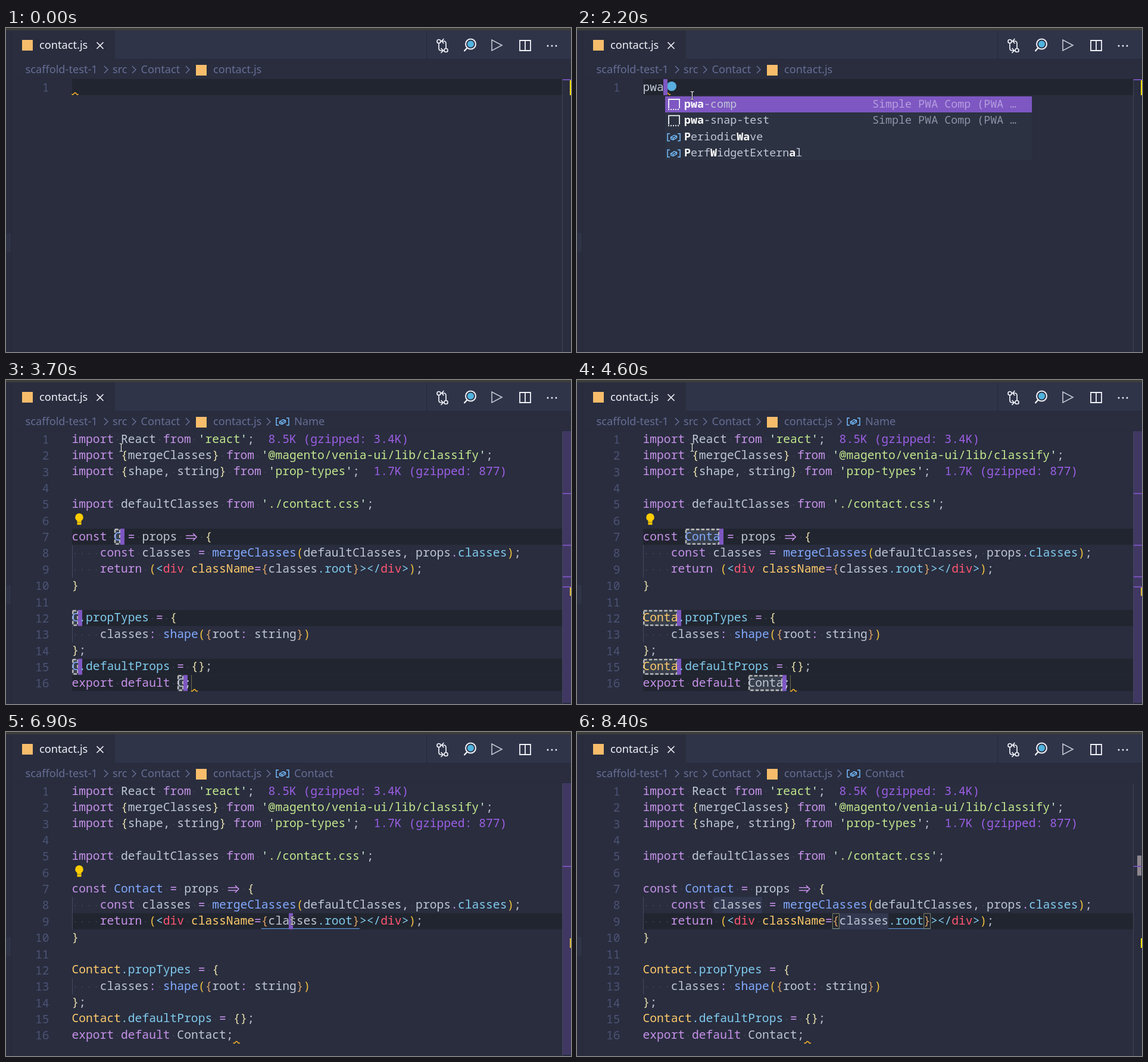
Animation of 949 by 545 pixels, one loop 8600 ms. Source, as an HTML page with a canvas:

```html
<!DOCTYPE html>
<html lang="en">
<head>
<meta charset="utf-8">
<title>Snippet in an editor</title>
<style>
html, body { margin: 0; height: 100%; overflow: hidden; background: #292d3e; }
canvas { display: block; }
</style>
</head>
<body>
<canvas id="stage" width="949" height="545"></canvas>
<script>
const ctx = document.getElementById('stage').getContext('2d');
const LOOP = 8600, LEFT = 110.5, TOP = 86, CELL = 11.79, ROW = 27.35, RULER = 17.4;
const CODE_FONT = '19.65px "Noto Sans Mono", monospace';
const LIST_FONT = '18.35px "Noto Sans Mono", monospace';
const UI_FONT = '18.2px "Noto Sans", sans-serif';
const PURPLE = '#7e57c2', YELLOW = '#ffb62c', BLUE = '#75beff', MUTED = '#676e95', WHITE = '#f0f2f8';

const COLORS = {
  k: '#c792ea', t: '#bfc7d5', q: '#d9f5dd', s: '#c3e88d', y: '#e4dcaa', b: '#82aaff',
  c: '#80cbee', r: '#ff5572', o: '#ffcb6b', g: '#f0c040', a: '#d9a066', p: '#9d5fe6'
};

// Each piece starts with its colour key.
const snippet = name => {
  const owner = name.length > 1 ? 'o' : 'b';
  return [
    "kimport §tReact §kfrom §q'§sreact§q'§t;§p  8.5K (gzipped: 3.4K)",
    "kimport §y{§tmergeClasses§y} §kfrom §q'§s@magento/venia-ui/lib/classify§q'§t;",
    "kimport §y{§tshape, string§y} §kfrom §q'§sprop-types§q'§t;§p  1.7K (gzipped: 877)",
    "",
    "kimport §tdefaultClasses §kfrom §q'§s./contact.css§q'§t;",
    "",
    `kconst §b${name} §k= §tprops §k=> §y{`,
    "t    §kconst §tclasses §k= §bmergeClasses§g(§tdefaultClasses, props§k.§cclasses§g)§t;",
    "t    §kreturn §g(§c<§rdiv §oclassName§k=§a{§tclasses§c.root§a}§c></§rdiv§c>§g)§t;",
    "y}",
    "",
    `${owner}${name}§c.propTypes §k= §y{`,
    "t    classes§k: §bshape§g(§a{§troot§k: §tstring§a}§g)",
    "y}§t;",
    `${owner}${name}§c.defaultProps §k= §y{}§t;`,
    `kexport default §t${name};`
  ];
};

// The name field: [row, column] of every linked copy.
const FIELDS = [[7, 6], [12, 0], [15, 0], [16, 15]];
const NAMES = [[2300, 'Name'], [3700, 'C'], [4100, 'Co'], [4300, 'Con'], [4500, 'Cont'],
  [4600, 'Conta'], [4900, 'Contac'], [5000, 'Contact']];
const TYPED = [[0, ''], [1600, 'p'], [1800, 'pw'], [2000, 'pwa']];
const CARET_ON = [[600, 1100], [1600, 2800], [3300, 5600], [6000, 6500], [6800, 7400], [7900, 8400]];
const POINTER = [[200, 171, 43], [300, 184, 90], [400, 193, 121], [600, 193, 121], [900, 193, 113],
  [6200, 193, 113], [6300, 341, 153], [6400, 341, 153], [6800, 480, 317], [7300, 480, 317],
  [7500, 470, 200], [7700, 446, 80], [7900, 450, 11]];
const SUGGESTIONS = ['pwa-comp', 'pwa-snap-test', 'PeriodicWave', 'PerfWidgetExternal'];

const colX = col => LEFT + col * CELL;
const rowY = row => TOP + (row - 1) * ROW;
const latest = (steps, t) => steps.filter(step => step[0] <= t).pop()[1];

function rect(x, y, w, h, color) {
  ctx.fillStyle = color;
  ctx.fillRect(x, y, w, h);
}
function text(str, x, y, color, font) {
  ctx.font = font;
  ctx.fillStyle = color;
  ctx.fillText(str, x, y);
}
function stroke(path, color, width = 1.5) {
  ctx.strokeStyle = color;
  ctx.lineWidth = width;
  ctx.stroke(new Path2D(path));
}
function disc(x, y, r, color) {
  ctx.fillStyle = color;
  ctx.beginPath();
  ctx.arc(x, y, r, 0, 7);
  ctx.fill();
}
function ring(x, y, r, color, width = 1.7) {
  ctx.strokeStyle = color;
  ctx.lineWidth = width;
  ctx.beginPath();
  ctx.arc(x, y, r, 0, 7);
  ctx.stroke();
}
function symbolIcon(x, y) {
  stroke(`M${x + 4} ${y - 6}h-4v12h4M${x + 17} ${y - 6}h4v12h-4`, BLUE);
  stroke(`M${x + 5.5} ${y}l6-3.5 4 1.5v3l-6 3.5-4-1.5zl4 1.5 6-3.5M${x + 9.5} ${y + 1.5}v3`, BLUE, 1.4);
}
function squiggle(x, y) {
  let path = '';
  for (let i = 0; i <= 11; i += 0.5)
    path += `${i ? 'L' : 'M'}${x + i} ${y - 1.6 * Math.cos((i - 5.5) * Math.PI / 4)}`;
  stroke(path, YELLOW);
}
function caret(row, x) {
  rect(Math.round(x), rowY(row), 7, ROW - 0.4, PURPLE);
}
function highlight(row) {
  rect(111, rowY(row), 823, ROW - 0.4, '#21252f');
}

function drawFrame() {
  rect(0, 0, 949, 545, '#292d3e');
  rect(183, 4, 766, 49, '#2f3449');
  rect(0, 0, 949, 4, '#3d3c39');
  rect(8, 4, 2, 541, '#272a3a');
  rect(0, 345, 8, 32, '#2f3346');
  rect(183, 52, 766, 1, '#272a39');
  rect(706, 4, 1, 49, '#272a39');

  rect(27, 20, 18, 18, '#f7bd6b');
  text('contact.js', 56, 35, WHITE, UI_FONT);
  stroke('M152.500 24l11 11M163.500 24l-11 11', WHITE, 1.7);

  ring(727, 22.5, 3, WHITE);
  ring(739, 37.5, 3, WHITE);
  stroke('M727 26v8q0 4 4 4h3m-3.500-4l4 4-4 4M739 34v-8q0-4-4-4h-3m3.500 4l-4-4 4-4', WHITE, 1.7);
  ring(780.5, 27, 8.5, WHITE, 2);
  disc(780.5, 27, 5.5, '#4fb3dd');
  stroke('M774.500 33.500l-5 5.500', WHITE, 2.4);
  stroke('M816 20v18l17-9z', '#c5c8d2', 1.6);
  stroke('M863 21h18v17h-18zM872 21v17', WHITE, 1.8);
  for (const x of [910, 917, 924]) disc(x, 30, 1.5, WHITE);
}

function drawBreadcrumbs(symbol) {
  const label = (str, x) => text(str, x, 76, MUTED, UI_FONT);
  const chevron = x => stroke(`M${x - 3} 64l6 6-6 6`, MUTED);
  label('scaffold-test-1', 32.5);
  label('src', 179);
  label('Contact', 226.5);
  label('contact.js', 348);
  [168, 215, 305].forEach(chevron);
  rect(319, 62, 18, 18, '#f7bd6b');
  if (symbol) {
    chevron(441);
    symbolIcon(454, 70);
    label(symbol, 484);
  }
  rect(10, 85, 939, 1, '#262a39');
}

function drawNumber(row) {
  ctx.textAlign = 'right';
  text(row, 72.5, rowY(row) + 21, '#4c5374', CODE_FONT);
  ctx.textAlign = 'left';
}

function drawLine(line, row) {
  const y = rowY(row) + 19.5;
  let col = 0;
  for (const piece of line.split('§')) {
    const key = piece[0], str = piece.slice(1), color = COLORS[key];
    if (str.startsWith('=>')) {
      const x = colX(col), mid = y - 5.5;
      stroke(`M${x + 3} ${mid - 2.3}h15M${x + 3} ${mid + 2.3}h15M${x + 15} ${mid - 6}l6 6-6 6`, color);
    } else if (str) {
      text(str, colX(col), y, color, CODE_FONT);
    }
    if (key !== 'p')
      [...str].forEach((ch, i) => {
        if (ch === ' ') disc(colX(col + i + 0.5), y - 5, 1, '#42475d');
      });
    col += str.length;
  }
}

function drawFields(name, selected, caretOn) {
  for (const [row, col] of FIELDS) {
    const x = colX(col) + 0.5, y = rowY(row), w = name.length * CELL - 1;
    rect(x, y, w, ROW - 0.4, selected ? '#4b4c73' : '#383f4c');
    ctx.setLineDash([5.5, 3]);
    stroke(`M${x + 1.3} ${y + 1.3}h${w - 2.6}v${ROW - 3}h${2.6 - w}z`, '#b8b8b8', 2.6);
    ctx.setLineDash([]);
    if (caretOn) caret(row, x + w - 1);
  }
}

function drawCode(t, caretOn) {
  const name = latest(NAMES, t), clicked = t >= 6800, related = t >= 7200;
  const endCol = 16 + name.length;
  if (clicked) {
    highlight(9);
    rect(colX(27), 330, 14 * CELL, 1.3, '#5a8fd0');
    if (related) {
      rect(colX(10), rowY(8), 7 * CELL, ROW, '#32384f');
      rect(colX(28), rowY(9), 7 * CELL, ROW, '#32384f');
      for (const col of [27, 40])
        stroke(`M${colX(col) + 0.5} ${rowY(9) + 0.5}h11v${ROW - 2}h-11z`, '#83886d', 1);
    }
    if (caretOn) caret(9, colX(31) - 0.5);
  } else {
    FIELDS.forEach(([row]) => highlight(row));
    drawFields(name, t < 3700, caretOn);
    rect(Math.round(colX(endCol)), rowY(16), 1, ROW - 1, '#716b4c');
  }
  for (const row of [8, 9, 13]) rect(111, rowY(row), 1, ROW, '#454a60');
  snippet(name).forEach((line, i) => {
    drawNumber(i + 1);
    drawLine(line, i + 1);
  });
  if (t >= 2800) squiggle(colX(endCol), 522);
  if (t >= 2800 && !related) {
    disc(123, 231, 6.8, '#ffcc00');
    rect(119.5, 236, 7, 7.5, '#ffcc00');
    rect(119.5, 239, 7, 1, '#8a7530');
  }
}

function drawSuggestions(typed) {
  const x = colX(typed.length) + 2.2, bold = `bold ${LIST_FONT}`;
  rect(x, 115, 616, 107, '#2c3241');
  rect(x, 115, 616, 27, PURPLE);
  SUGGESTIONS.forEach((label, i) => {
    const base = 134 + i * ROW;
    if (i < 2) {
      stroke(`M${x + 6} ${base + 1}v-15h18v15`, WHITE, 1.8);
      ctx.setLineDash([2, 2]);
      stroke(`M${x + 5} ${base + 3}h20`, WHITE, 2);
      ctx.setLineDash([]);
      text('Simple PWA Comp (PWA …', x + 348, base, i ? '#8f95aa' : '#b59fe0', LIST_FONT);
    } else {
      symbolIcon(x + 4, base - 5);
    }
    let matched = 0;
    [...label].forEach((ch, j) => {
      const hit = ch.toLowerCase() === typed[matched];
      if (hit) matched++;
      text(ch, x + 32 + j * 11.01, base, hit ? '#ffffff' : '#bfc7d5', hit ? bold : LIST_FONT);
    });
  });
}

function drawTyping(t, caretOn) {
  const typed = latest(TYPED, t);
  highlight(1);
  drawNumber(1);
  squiggle(colX(typed.length), 110.5);
  if (t >= 2100) disc(159, 98, 8, '#58aede');
  if (caretOn) caret(1, colX(typed.length) - 0.5);
  text(typed, LEFT, rowY(1) + 19.5, COLORS.t, CODE_FONT);
  if (t >= 1700) drawSuggestions(typed);
}

function drawRuler(t) {
  const coded = t >= 2300;
  const rows = !coded ? [1] : t < 6800 ? FIELDS.map(f => f[0]) : [9];
  const markY = row => TOP + (row - 1) * RULER;
  rect(934, 86, 1, 459, '#414459');
  if (t >= 7200) rect(941, markY(8), 7, 2 * RULER - 1, '#8d868e');
  rect(947, coded ? markY(16) : 86, 2, coded ? 16 : 27, '#ffe000');
  for (const row of rows) rect(935, Math.round(markY(row)), 14, 2, '#7450b2');
  if (coded) {
    ctx.globalAlpha = 0.27 * Math.min(1, Math.max(0, (8400 - t) / 900));
    rect(935, 86, 14, 457, PURPLE);
    ctx.globalAlpha = 1;
  }
}

function drawPointer(t) {
  const next = POINTER.findIndex(key => key[0] >= t);
  if (next < 0 || t < POINTER[0][0]) return;
  const b = POINTER[next], a = POINTER[Math.max(0, next - 1)];
  const f = b === a ? 1 : (t - a[0]) / (b[0] - a[0]);
  const x = Math.round(a[1] + (b[1] - a[1]) * f) + 0.5, y = a[2] + (b[2] - a[2]) * f;
  const beam = `M${x - 3} ${y - 6}h2l1 1 1-1h2M${x} ${y - 5}v11M${x - 3} ${y + 7}h2l1-1 1 1h2`;
  stroke(beam, '#11131a', 2.6);
  stroke(beam, '#ffffff', 1.2);
}

function draw(now) {
  const t = Math.floor(now % LOOP / 100) * 100;
  const caretOn = CARET_ON.some(([from, to]) => t >= from && t < to);
  drawFrame();
  drawBreadcrumbs(t >= 5400 ? 'Contact' : t >= 2700 ? 'Name' : '');
  drawRuler(t);
  (t < 2300 ? drawTyping : drawCode)(t, caretOn);
  drawPointer(t);
}

const start = performance.now();
function tick() {
  draw(performance.now() - start);
  requestAnimationFrame(tick);
}
tick();
</script>
</body>
</html>
```
